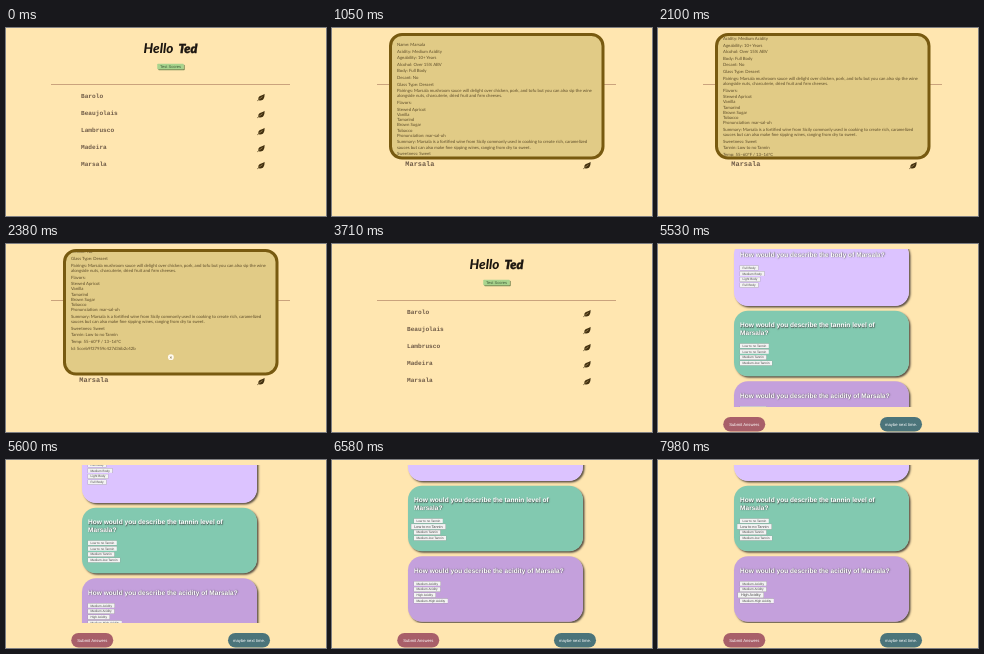
An HTML page for the animation above (8 s loop, 320 by 188 pixels).

```html
<!DOCTYPE html>
<html lang="en">
<head>
<meta charset="utf-8">
<title>Wine list and quiz</title>
<style>
  html, body { margin: 0; width: 100%; height: 100%; overflow: hidden; background: #ffe6b0; }
  /* Laid out at four times the stage size, then scaled down. */
  #stage { position: absolute; width: 1280px; height: 752px; transform: scale(.25); transform-origin: 0 0;
    overflow: hidden; text-rendering: geometricPrecision; font-family: "Liberation Sans", Arial, sans-serif; }
  #stage div, #stage svg { position: absolute; box-sizing: border-box; white-space: pre; }
  #list, #quiz { inset: 0; }

  .title { top: 49px; font: italic 800 54px/60px Pacifico, Lato, cursive; color: #1c1610; }
  .title.name { font-size: 50px; font-weight: 900; -webkit-text-stroke: 1.5px #1c1610; }
  .scores { left: 605px; top: 143px; width: 106px; height: 22px; border-radius: 3px; background: #a8d48e;
    box-shadow: 4px 4px 2px #7d8a56; font-size: 16px; line-height: 22px; text-align: center; color: #3c5a36; }
  .rule { left: 180px; top: 224px; width: 956px; height: 3px; background: #b98d6c; }
  .wine { left: 300px; height: 28px; font: bold 24.5px/28px "Liberation Mono", monospace; color: #6f5b47; }
  .leaf { left: 1004px; width: 32px; height: 32px; }

  #modal { left: 228px; top: 20px; width: 862px; height: 506px; border: 12px solid #785a10;
    border-radius: 52px; background: #e1cb86; overflow: hidden; }
  #facts { left: 20px; top: 22.5px; font: 17.2px/21px Lato, sans-serif; color: #5d4c29; }
  #facts p { margin: 0 0 5.4px; }
  #close { left: 388px; top: 552px; width: 23px; height: 23px; border-radius: 50%; background: #fffaf0;
    font: bold 18px/22px "Liberation Sans", sans-serif; text-align: center; color: #8a7a50; }

  #view { left: 280px; top: 20px; width: 750px; height: 632px; overflow: hidden; }
  #cards { left: 24px; top: 20px; }
  .card { width: 700px; height: 262px; padding: 41px 24px; border-radius: 56px; box-shadow: 6px 6px 8px #5c5144; }
  .card h2 { margin: 0 0 30px; font-size: 26.3px; line-height: 30.5px; color: #fff; text-shadow: 2px 2px 5px #444; }
  .card span { display: block; width: fit-content; height: 17px; margin-bottom: 6px; padding: 0 10px;
    background: #f3f3f3; box-shadow: 0 0 0 1px #999; font-size: 12.6px; line-height: 17px; color: #444; }
  .pill { top: 692px; width: 168px; height: 58px; border-radius: 29px; font-size: 16.8px; line-height: 58px;
    text-align: center; color: #fff; }
</style>
</head>
<body>
<div id="stage">
  <div id="list">
    <div class="title" style="left:550px">Hello</div>
    <div class="title name" style="left:690px">Ted</div>
    <div class="scores">Test Scores</div>
    <div class="rule"></div>
    <div id="modal"><div id="facts"></div></div>
  </div>
  <div id="quiz">
    <div id="view"><div id="cards"></div></div>
    <div class="pill" style="left:261px;background:#a85f69">Submit Answers</div>
    <div class="pill" style="left:888px;background:#4b747a">maybe next time.</div>
  </div>
</div>
<script>
const LOOP = 8000, STEP = 70;
const $ = id => document.getElementById(id);

const wines = ["Barolo", "Beaujolais", "Lambrusco", "Madeira", "Marsala"];
const facts = [
  "Name: Marsala", "Acidity: Medium Acidity", "Ageability: 10+ Years", "Alcohol: Over 15% ABV",
  "Body: Full Body", "Decant: No", "Glass Type: Dessert",
  "Pairings: Marsala mushroom sauce will delight over chicken, pork, and tofu but you can also sip the wine\n" +
  "alongside nuts, charcuterie, dried fruit and firm cheeses.",
  "Flavors:",
  "Stewed Apricot\nVanilla\nTamarind\nBrown Sugar\nTobacco\nPronunciation: mar-sal-uh",
  "Summary: Marsala is a fortified wine from Sicily commonly used in cooking to create rich, caramelized\n" +
  "sauces but can also make fine sipping wines, ranging from dry to sweet.",
  "Sweetness: Sweet", "Tannin: Low to no Tannin", "Temp: 55–60°F / 13–16°C", "Id: 5cceb9f37959c427d36b2c42b"
];
const questions = [
  ["#4dbcff", "How sweet is Marsala?", "Very Sweet", "Dry", "Sweet", "Sweet"],
  ["#dcc3ff", "How would you describe the body of Marsala?", "Full Body", "Medium Body", "Light Body", "Full Body"],
  ["#82c9b0", "How would you describe the tannin level of\nMarsala?",
    "Low to no Tannin", "Low to no Tannin", "Medium Tannin", "Medium-low Tannin"],
  ["#c4a0dc", "How would you describe the acidity of Marsala?",
    "Medium-Acidity", "Medium Acidity", "High Acidity", "Medium-High Acidity"]
];

const leaf = y => `<svg class="leaf" style="top:${y}px" viewBox="0 0 32 32">
  <path d="M30 1C31 14 28 28 13 28Q9 28 7 26Q2 16 12 10C19 6 26 7 30 1Z" fill="#42300f"/>
  <path d="M1 31Q8 20 21 13" fill="none" stroke="#42300f" stroke-width="3"/>
  <path d="M8 24Q13 17 22 13" fill="none" stroke="#d9bd80" stroke-width="2"/></svg>`;

$("modal").insertAdjacentHTML("beforebegin", wines.map((name, i) =>
  `<div class="wine" style="top:${260 + 68 * i}px">${name}</div>` + leaf(262 + 68 * i)).join(""));
$("facts").innerHTML = facts.map(f => `<p>${f}</p>`).join("") + '<div id="close">×</div>';
$("cards").innerHTML = questions.map(([color, title, ...options], i) =>
  `<div class="card" style="top:${281.5 * i}px;background:${color}"><h2>${title}</h2>` +
  options.map(o => `<span>${o}</span>`).join("") + "</div>").join("");

const lastWine = [...document.querySelectorAll(".wine")].pop();
const lastLeaf = [...document.querySelectorAll(".leaf")].pop();
const answers = document.querySelectorAll(".card span");
const tanninAnswer = answers[9], acidityAnswer = answers[14];

// Linear interpolation through [time, value] points.
function track(t, points) {
  let [t0, v0] = points[0];
  for (const [t1, v1] of points) {
    if (t < t1) return t <= t0 ? v0 : v0 + (v1 - v0) * (t - t0) / (t1 - t0);
    [t0, v0] = [t1, v1];
  }
  return v0;
}
const between = (t, from, to) => t >= from && t < to;
const show = (el, on) => el.style.visibility = on ? "visible" : "hidden";
const grow = (el, scale) => el.style.transform = `scale(${scale})`;
const scroll = (el, y) => el.style.transform = `translateY(${-y}px)`;

function draw(now) {
  const t = Math.floor(now % LOOP / STEP) * STEP;
  const quizOpen = t >= 4830;
  $("list").style.display = quizOpen ? "none" : "block";
  $("quiz").style.display = quizOpen ? "block" : "none";
  show($("modal"), between(t, 1050, 3710));
  grow(lastWine, between(t, 350, 3710) ? 1.13 : 1);
  grow(lastLeaf, t >= 4480 ? 1.15 : 1);
  scroll($("facts"), track(t, [[1960, 0], [2100, 50], [2170, 50], [2310, 140], [2380, 166]]));
  scroll($("cards"), track(t, [[5250, 0], [5320, 60], [5460, 260], [5600, 412], [5740, 465], [5880, 490], [6090, 500]]));
  grow(tanninAnswer, track(t, [[6160, 1], [6440, 1.19]]));
  grow(acidityAnswer, track(t, [[7560, 1], [7840, 1.19]]));
  requestAnimationFrame(() => draw(performance.now() - start));
}
const start = performance.now();
draw(0);
</script>
</body>
</html>
```
